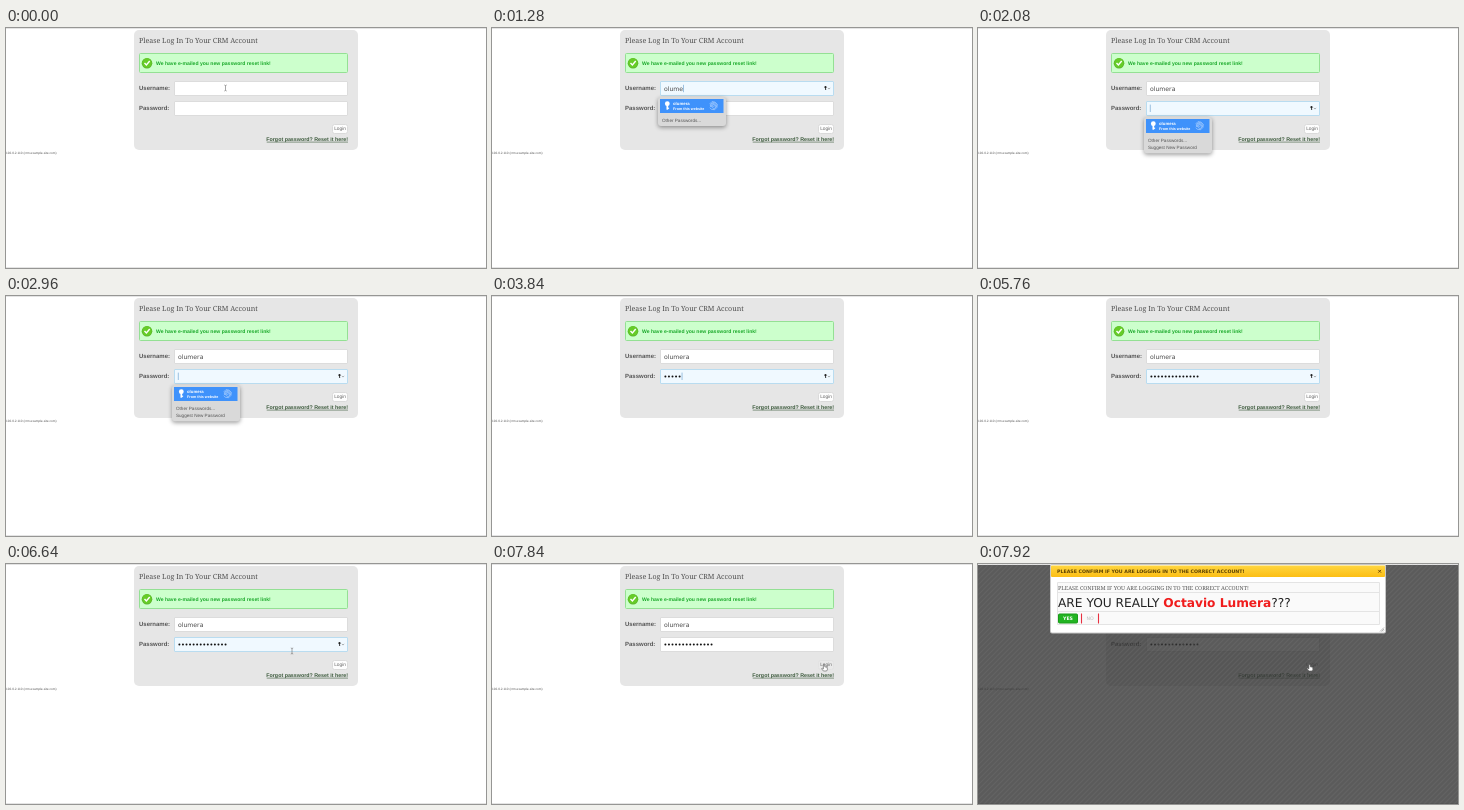
Write an HTML page with a canvas that moves like this. It is 480x240 px and loops after 8000 ms.

```html
<!DOCTYPE html>
<html lang="en">
<head>
<meta charset="utf-8">
<title>Login</title>
<style>
html, body { margin: 0; width: 100%; height: 100%; overflow: hidden; background: #fff; }
canvas { display: block; width: 480px; height: 240px; }
</style>
</head>
<body>
<canvas id="stage" width="480" height="240"></canvas>
<script>
const ctx = document.getElementById('stage').getContext('2d');
ctx.textRendering = 'geometricPrecision';

const LOOP = 8000, STEP = 80;
const SANS = '"Liberation Sans", Arial, sans-serif';
const WIDE = '"DejaVu Sans", Verdana, sans-serif';
const SERIF = '"Noto Serif", Georgia, serif';
const USER = 'olumera';
const PASS_LENGTH = 14, DOT_GAP = 3.55;
const CONFIRM = 'PLEASE CONFIRM IF YOU ARE LOGGING IN TO THE CORRECT ACCOUNT!';

const T = {
  userFocus: 400, userType: 720, userKey: 130,
  passFocus: 1920, passType: 3280, passKey: 122,
  move: 6080, pause: 6640, arrive: 7360, press: 7680, dialog: 7920
};

function box(x, y, w, h, fill, stroke, r = 0) {
  ctx.beginPath();
  ctx.roundRect(x, y, w, h, r);
  if (fill) { ctx.fillStyle = fill; ctx.fill(); }
  if (stroke) { ctx.strokeStyle = stroke; ctx.lineWidth = 1; ctx.stroke(); }
}

function text(str, x, y, size, color, family = SANS, weight = '', align = 'left') {
  ctx.font = `${weight} ${size}px ${family}`;
  ctx.fillStyle = color;
  ctx.textAlign = align;
  ctx.fillText(str, x, y);
  return ctx.measureText(str).width;
}

function line(points, color, width = 1) {
  ctx.beginPath();
  points.forEach(([x, y], i) => i ? ctx.lineTo(x, y) : ctx.moveTo(x, y));
  ctx.strokeStyle = color;
  ctx.lineWidth = width;
  ctx.stroke();
}

function disc(x, y, r, color) {
  ctx.beginPath();
  ctx.arc(x, y, r, 0, Math.PI * 2);
  ctx.fillStyle = color;
  ctx.fill();
}

function key(x, y, s, color) {
  disc(x, y, 2 * s, color);
  line([[x, y], [x, y + 5 * s]], color, 1.4 * s);
  line([[x, y + 3.8 * s], [x + 1.5 * s, y + 3.8 * s]], color, s);
}

function field(y, focused) {
  box(168.5, y + .5, 173, 14, focused ? '#f0f9ff' : '#fff', focused ? '#b9dcf0' : '#dcdcdc', .5);
  if (!focused) return;
  key(333.5, y + 6.2, .55, '#222');
  line([[335.8, y + 7], [337, y + 8], [338.2, y + 7]], '#777', .6);
}

function caret(x, y) {
  line([[x, y - 3.7], [x, y + 3.7]], '#86b2d8', .8);
}

function page(t) {
  ctx.fillStyle = '#fff';
  ctx.fillRect(0, 0, 480, 240);
  ctx.fillStyle = '#e4e4e4';
  ctx.fillRect(0, 0, 480, 1);
  ctx.fillRect(0, 239, 480, 1);
  box(128, 2, 224, 120, '#e6e6e6', null, 5);
  text('Please Log In To Your CRM Account', 133, 15.1, 7.08, '#505050', SERIF);

  box(133.5, 25.5, 208, 19, '#ccffcc', '#94e094', 1);
  disc(141, 35.2, 5.3, '#5cb82c');
  disc(141, 34.9, 4.6, '#66cc28');
  line([[138.5, 35], [140.4, 37], [143.7, 33]], '#fff', 1.4);
  text('We have e-mailed you new password reset link!', 150, 37, 5.08, '#18a828', SANS, 'bold');

  text('Username:', 133, 62, 6, '#555', SANS, 'bold');
  text('Password:', 133, 81.5, 6, '#555', SANS, 'bold');

  const inUser = t >= T.userFocus && t < T.passFocus;
  const inPass = t >= T.passFocus && t < T.press;
  const count = (start, each, max) => Math.max(0, Math.min(max, 1 + Math.floor((t - start) / each)));
  const letters = count(T.userType, T.userKey, USER.length);
  const dots = count(T.passType, T.passKey, PASS_LENGTH);
  const blink = t < T.passType + T.passKey * PASS_LENGTH + 500 || t % 1000 < 500;

  field(53, inUser);
  field(73, inPass);
  const end = 172 + text(USER.slice(0, letters), 172, 63, 6.15, '#4a4a4a', WIDE);
  for (let i = 0; i < dots; i++) disc(173.4 + i * DOT_GAP, 80.5, 1, '#111');
  if (inUser) caret(end + .4, 60.5);
  if (inPass && blink) caret(172.3 + dots * DOT_GAP, 80.3);

  const down = t >= T.press;
  box(326.5, 96.5, 15, 9, down ? '#e9e9e9' : '#fdfdfd', down ? '#e2e2e2' : '#dadada', 2);
  text('Login', 334, 102.3, 4.8, '#666', SANS, '', 'center');
  text('Forgot password? Reset it here!', 342, 113, 5.33, '#3c5a3c', SANS, 'bold', 'right');
  line([[260.7, 114.1], [342, 114.1]], '#3c5a3c', .6);
  text('192.0.2.110 (crm.example-site.com)', 0, 126.2, 3.18, '#555');

  if (inUser) menu(69, ['Other Passwords...']);
  if (inPass && t < T.passType) menu(89, ['Other Passwords...', 'Suggest New Password']);
}

function menu(y, items) {
  ctx.save();
  ctx.shadowColor = 'rgba(0,0,0,.4)';
  ctx.shadowBlur = 4;
  ctx.shadowOffsetY = 1.5;
  box(166, y, 68, 21.5 + items.length * 7.4, '#d9d9d9', null, 3);
  ctx.restore();
  box(168, y + 2, 63.5, 14, '#3f92fb');
  key(175.3, y + 6.7, 1.2, '#fff');
  text(USER, 181, y + 8, 4.3, '#fff', SANS, 'bold');
  text('From this website', 181, y + 13, 3.7, '#fff', SANS, 'bold');
  for (let r = 1; r <= 4; r++) {
    ctx.beginPath();
    ctx.arc(221.3, y + 8.7, r, r * .9, r * .9 + 5.3);
    ctx.strokeStyle = '#c8e0ff';
    ctx.lineWidth = .55;
    ctx.stroke();
  }
  items.forEach((item, i) => text(item, 170, y + 24.7 + i * 7.2, 4.6, '#555'));
}

function beam(x, y) {
  const color = '#808080';
  line([[x - 1.2, y - 3], [x, y - 2.5], [x, y + 2.5], [x - 1.2, y + 3]], color, .7);
  line([[x + 1.2, y - 3], [x, y - 2.5]], color, .7);
  line([[x + 1.2, y + 3], [x, y + 2.5]], color, .7);
}

function polygon(x, y, points, fill, stroke) {
  ctx.beginPath();
  points.forEach(([dx, dy]) => ctx.lineTo(x + dx, y + dy));
  ctx.closePath();
  ctx.fillStyle = fill;
  ctx.fill();
  ctx.strokeStyle = stroke;
  ctx.lineWidth = .6;
  ctx.stroke();
}

const arrow = (x, y) => polygon(x, y, [[0, 0], [0, 6], [1.5, 4.7], [2.5, 7], [3.4, 6.5], [2.5, 4.4], [4.4, 4.4]], '#222', '#fff');
const hand = (x, y) => polygon(x, y,
  [[-.6, 0], [.6, 0], [.8, 2.3], [3.2, 2.8], [3.4, 5], [2.6, 6.5], [-.6, 6.5], [-2.4, 4.2], [-1.8, 3.6], [-.6, 4.4]], '#fff', '#555');

function pointer(t) {
  if (t >= T.userType && t < T.move) return;
  const ease = (a, b) => {
    const p = Math.max(0, Math.min(1, (t - a) / (b - a)));
    return p * p * (3 - 2 * p);
  };
  const a = ease(T.move, T.pause), b = ease(T.pause, T.arrive);
  const x = 219.5 + 66.5 * a + 46 * b, y = 60 + 27 * a + 13.5 * b;
  if (x > 326 && y > 96) hand(x, y);
  else if (y < 68 || y > 73 && y < 88) beam(x, y);
  else arrow(x, y);
}

function dialog() {
  ctx.fillStyle = 'rgba(50,50,50,.8)';
  ctx.fillRect(0, 1, 480, 239);
  for (let x = -240; x < 480; x += 5) line([[x, 241], [x + 240, 1]], 'rgba(125,125,125,.25)', 1.2);

  box(72.5, .5, 335, 68.5, '#fff', '#c8c8c8', 1.5);
  const bar = ctx.createLinearGradient(0, 1.5, 0, 13);
  bar.addColorStop(0, '#ffd640');
  bar.addColorStop(1, '#fcbe14');
  box(73, 1.5, 334, 11.5, bar, null, 1);
  text(CONFIRM, 79, 8.7, 4.73, '#5c4000', WIDE, 'bold');
  line([[400.3, 5.9], [403, 8.6]], '#6b4300', 1);
  line([[403, 5.9], [400.3, 8.6]], '#6b4300', 1);

  box(79.5, 18.5, 322, 42, '#fafafa', '#e4e4e4');
  line([[79, 28.5], [402, 28.5]], '#e4e4e4');
  line([[79, 47.5], [402, 47.5]], '#e4e4e4');
  text(CONFIRM, 80, 25.5, 5.5, '#555', SERIF);
  let x = 80;
  x += text('ARE YOU REALLY ', x, 43, 12.2, '#222', WIDE);
  x += text('Octavio Lumera', x, 43, 12.2, '#f01c1c', WIDE, 'bold');
  text('???', x, 43, 12.2, '#222', WIDE);

  box(80.5, 50, 19, 9, '#22b422', '#1a9c1a', 1);
  text('YES', 90, 56.3, 4.7, '#fff', WIDE, 'bold', 'center');
  box(103, 49.5, 18, 10, '#f8f8f8', null, 1);
  line([[103.5, 49.5], [103.5, 59.5]], '#e83040', 1.1);
  line([[120.5, 49.5], [120.5, 59.5]], '#e83040', 1.1);
  text('NO', 112, 56.3, 4.7, '#bbb', WIDE, '', 'center');
  for (let d = 1; d <= 4; d += 1.5) line([[406 - d, 67.5], [406, 67.5 - d]], '#888', .6);
  hand(331.5, 100.5);
}

function draw(now) {
  const t = Math.floor(now % LOOP / STEP) * STEP;
  page(t);
  if (t >= T.dialog) dialog();
  else pointer(t);
  requestAnimationFrame(draw);
}
requestAnimationFrame(draw);
</script>
</body>
</html>
```
